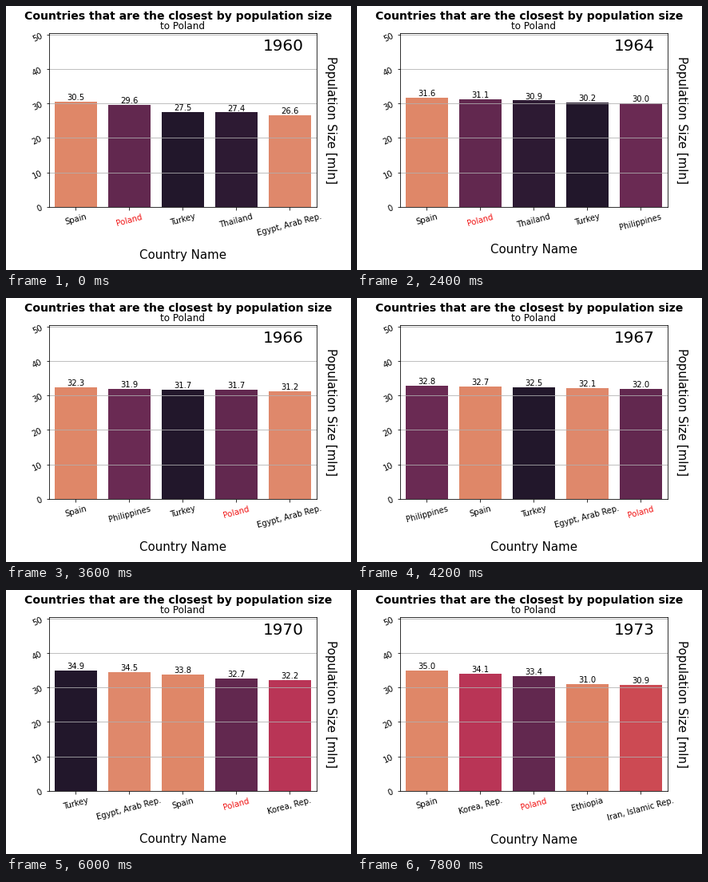
A matplotlib script for the animation above (8 s loop, 432 px wide and 331 px high).

```python
import matplotlib.pyplot as plt
from matplotlib.animation import FuncAnimation

W, H, DPI = 432, 331, 72
FIRST_YEAR = 1960
TICKS_PER_YEAR = 3
INTERVAL = 200
FRAMES = 40
LABEL_DROP = 0.02

COUNTRIES = {
    "S": ("Spain", "#df8768"),
    "P": ("Poland", "#62284f"),
    "T": ("Turkey", "#22172b"),
    "H": ("Thailand", "#2d1a33"),
    "E": ("Egypt, Arab Rep.", "#df886b"),
    "F": ("Philippines", "#6a2a53"),
    "K": ("Korea, Rep.", "#b93556"),
    "O": ("Ethiopia", "#de8365"),
    "I": ("Iran, Islamic Rep.", "#cc4a53"),
}

# One row per year: country keys from largest to smallest, millions of people
RANKING = [
    ("SPTHE", (30.46, 29.64, 27.47, 27.40, 26.63)),
    ("SPHTE", (30.74, 29.96, 28.22, 28.14, 27.37)),
    ("SPHTE", (31.02, 30.31, 29.07, 28.83, 28.11)),
    ("SPHTF", (31.30, 30.69, 29.96, 29.53, 29.02)),
    ("SPHTF", (31.61, 31.14, 30.87, 30.24, 29.97)),
    ("SHPTF", (31.96, 31.82, 31.44, 30.97, 30.91)),
    ("SFTPE", (32.34, 31.88, 31.72, 31.68, 31.20)),
    ("FSTEP", (32.83, 32.68, 32.48, 32.06, 31.99)),
    ("TSEPK", (33.26, 33.11, 32.88, 32.29, 30.84)),
    ("TESPK", (34.06, 33.70, 33.44, 32.54, 31.54)),
    ("TESPK", (34.88, 34.51, 33.81, 32.66, 32.24)),
    ("TESKP", (35.72, 35.31, 34.22, 32.88, 32.78)),
    ("SKPOI", (34.60, 33.51, 33.06, 30.14, 30.09)),
    ("SKPOI", (35.00, 34.10, 33.36, 31.04, 30.86)),
]

plt.rcParams["font.family"] = "DejaVu Sans"
fig = plt.figure(figsize=(W / DPI, H / DPI), dpi=DPI, facecolor="white")
ax = fig.add_axes([0.125, 79.345 / H, 0.775, 217.44 / H])

fig.text(0.5, 1 - 17.2 / H, "Countries that are the closest by population size",
         size=14, weight="bold", ha="center", va="baseline")
fig.text(398.8 / W, 1 - 143.5 / H, "Population Size [mln]",
         size=15, rotation=270, ha="left", va="center")

ax.set_title("to Poland", size=12, pad=5.5)
ax.set_xlabel("Country Name", size=15, labelpad=15)
ax.set_xlim(-0.5, 4.5)
ax.set_ylim(0, 50.4)
ax.set_xticks(range(5))
ax.set_yticks(range(0, 51, 10))
ax.tick_params(axis="x", labelrotation=15, pad=4)
ax.tick_params(axis="y", labelrotation=25)
ax.grid(axis="y")

year_text = ax.text(0.8, 0.9, "", size=20, transform=ax.transAxes)
bars = ax.bar(range(5), [0] * 5, width=0.8, linewidth=0)
values = [ax.text(i, 0, "", size=10, ha="center", va="bottom")
          for i in range(5)]


def draw(frame):
    step = frame // TICKS_PER_YEAR
    keys, sizes = RANKING[step]
    names = [COUNTRIES[k][0] for k in keys]
    year_text.set_text(str(FIRST_YEAR + step))
    for bar, value, key, size in zip(bars, values, keys, sizes):
        bar.set_height(size)
        bar.set_facecolor(COUNTRIES[key][1])
        value.set_y(size - LABEL_DROP)
        value.set_text(f"{size:.1f}")
    ax.set_xticklabels(names)
    for label, name in zip(ax.get_xticklabels(), names):
        label.set_color("#f01010" if name == "Poland" else "black")
    return []


anim = FuncAnimation(fig, draw, frames=FRAMES, init_func=lambda: draw(0),
                     interval=INTERVAL, repeat=True, repeat_delay=0)
plt.show()
```
